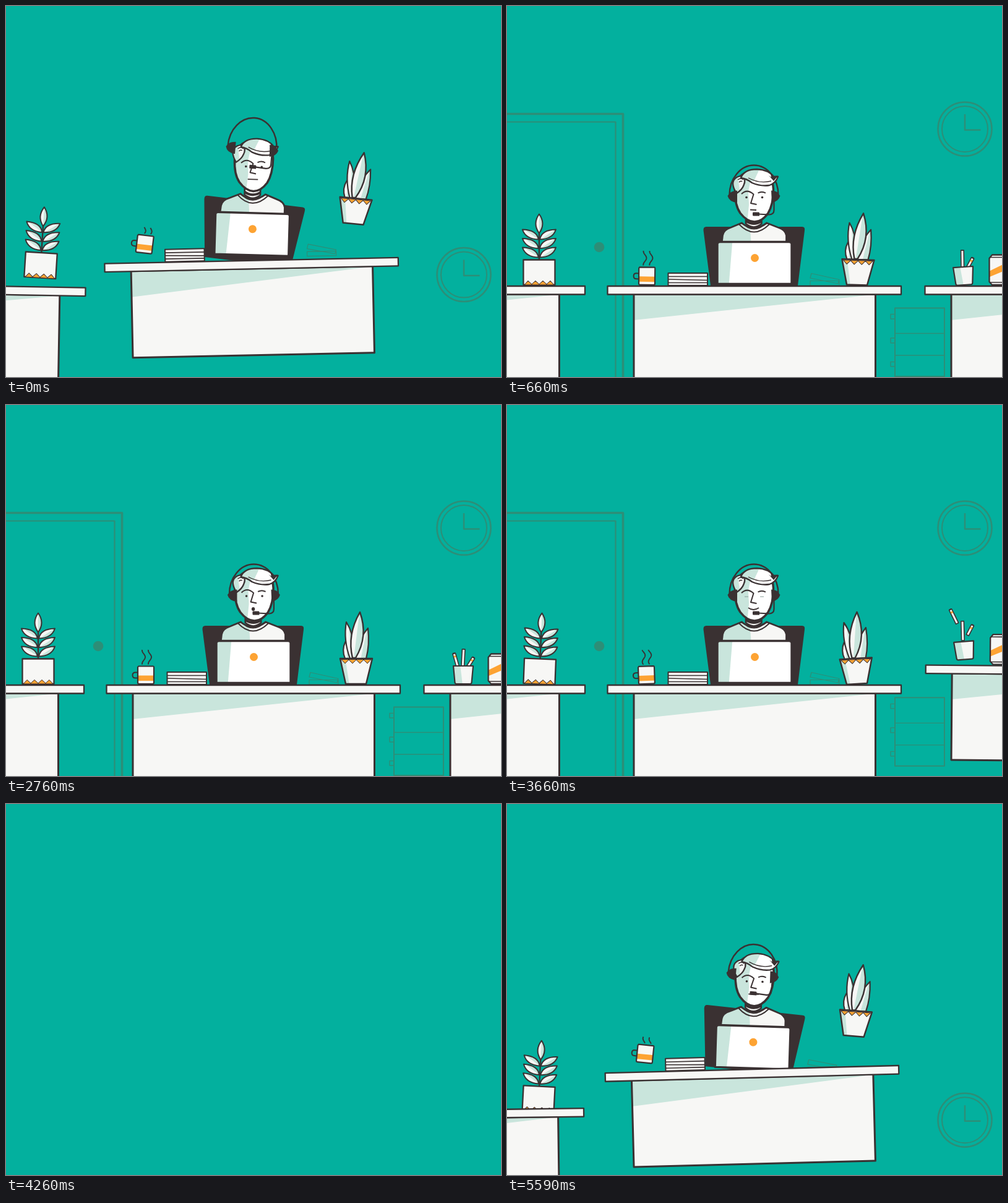
An HTML page with a canvas that plays this animation: 800x600 px, repeating every 5620 ms.

```html
<!DOCTYPE html>
<html lang="en">
<head>
<meta charset="utf-8">
<title>Office desk</title>
<style>
html, body { margin: 0; width: 100%; height: 100%; overflow: hidden; background: #03b09e; }
canvas { display: block; }
</style>
</head>
<body>
<canvas id="stage" width="800" height="600"></canvas>
<script>
const g = document.getElementById('stage').getContext('2d');
const LOOP = 5620, BG = '#03b09e', DARK = '#3a3132', WHITE = '#f7f7f5', PURE = '#ffffff',
  MINT = '#c9e5dc', ORANGE = '#fda333', FAINT = '#2d8e77';

const clamp = (x, a = 0, b = 1) => Math.max(a, Math.min(b, x));
const smooth = (a, b, x) => { const u = clamp((x - a) / (b - a)); return u * u * (3 - 2 * u); };

// Comes up from below, crosses rest at c with speed v, overshoots, is back after len.
function rise(e, c, v, len, cap = 1e4) {
  const d = e - c;
  if (d >= len) return 0;
  return d < 0 ? Math.min(cap, -v * d * (1 - 0.0006 * d)) : -v * d * (1 - d / len) ** 2;
}
// Slides up without overshoot.
const glide = (e, end) => 315 * (Math.max(0, end - e) / 336) ** 3;
// Swing in degrees that fades out at end.
const swing = (e, zero, period, amp, from, end) =>
  amp * Math.sin(2 * Math.PI * (e - zero) / period) * clamp((end - e) / (end - from), 0, 1.15);

const cache = new Map();
function path(d) {
  if (!cache.has(d)) cache.set(d, new Path2D(d));
  return cache.get(d);
}
function fill(d, color) { g.fillStyle = color; g.fill(path(d)); }
function line(d, w = 2, color = DARK) {
  g.strokeStyle = color;
  g.lineWidth = w;
  g.stroke(path(d));
}
function part(d, w, shade, base = WHITE, tone = MINT) {
  fill(d, base);
  if (shade) {
    g.save();
    g.clip(path(d));
    fill(shade, tone);
    g.restore();
  }
  line(d, w);
}
function disc(x, y, r, color) {
  g.fillStyle = color;
  g.beginPath();
  g.arc(x, y, r, 0, 7);
  g.fill();
}
// Draw with a shift and a turn about (px, py).
function pose(px, py, dx, dy, deg, draw) {
  g.save();
  g.translate(px + dx, py + dy);
  g.rotate(deg * Math.PI / 180);
  g.translate(-px, -py);
  draw();
  g.restore();
}

function desk(x) {
  g.save();
  g.translate(x, 0);
  part('M43 466H433.500V606H43Z', 3, 'M43 460H440L420 468 43 508Z');
  part('M.500 453H475V466.500H.500Z', 2.3);
  g.restore();
}

function door() {
  line('M-5 174.500H187.500V640', 3.6, FAINT);
  line('M-5 187.500H175.500V640', 2.2, FAINT);
  disc(149, 390, 8.3, FAINT);
}

function clock() {
  line('M783.500 199A43.500 43.500 0 1 1 696.500 199A43.500 43.500 0 1 1 783.500 199Z', 2.5, FAINT);
  line('M777 199A37 37 0 1 1 703 199A37 37 0 1 1 777 199Z', 2, FAINT);
  line('M740 175V200.500H765.500', 2.5, FAINT);
}

function drawers() {
  line('M627 488.500H707V599H627Z', 2, FAINT);
  line('M627 529.500H707M627 565H707M627 498.500H620V506H627M627 537H620V545H627M627 575.500H620V583H627', 1.4, FAINT);
}

function leafPlant() {
  line('M52 411V364', 2.3);
  for (const y of [0, 14.5, 29]) {
    for (const s of [1, -1]) {
      g.save();
      g.translate(52, y);
      g.scale(s, 1);
      part('M1 377.500Q4 362 27 361.500Q22 377 1 377.500Z', 2,
        s > 0 ? 'M0 379L27 361 27 380Z' : 'M0 360H27L0 378Z');
      g.restore();
    }
  }
  part('M52 336.500Q63 352 52 367.500Q41 352 52 336.500Z', 2, 'M52 330H70V370H52Z');
  part('M26.500 410.500H77.500V451H26.500Z', 2.3);
  part('M28 451L34 444.500 40 450 46 444.500 52 450 58 444.500 64 450 70 444.500 76 451Z', 1, null, ORANGE);
}

function spikyPlant() {
  part('M548 410Q542 396 548.500 383Q557 394 557 410Z', 2.2, 'M551 380H560V412H551Z');
  part('M556 410Q545 380 550 351Q561 368 563 396L560 410Z', 2.2, 'M553 345L565 360V412H558Z');
  part('M564 410Q567 382 585 361Q588 388 582 410Z', 2.2, 'M585 355L590 412H573Z');
  part('M560 409Q551 372 572 335Q586 374 565 409Z', 2.4, 'M572 330L590 345 580 400 562 410Z');
  part('M540 410H592L582 451H549Z', 2.5, 'M538 408H548L555 453H540Z');
  part('M542 411.500L548 418 554 412 560 418 566 412 572 418 578 412 584 418 590 411.500Z', 1, null, ORANGE);
}

function mug(t, e) {
  line('M213 432.500H209Q204.500 432.500 204.500 437T209 441.500H213', 2);
  part('M214 422.500H238Q239 422.500 239 424V449Q239 451 237 451H215Q213 451 213 449V424Z', 2.2,
    'M210 437.500H241V446H210Z', WHITE, ORANGE);
  const len = 10 + 13.5 * smooth(330, 620, e);
  g.strokeStyle = DARK;
  g.lineWidth = 1.9;
  for (const x of [222.500, 232.500]) {
    g.beginPath();
    for (let k = 0; k <= len; k += 0.5)
      g.lineTo(x + 2.5 * Math.sin(k / 3.4 + t / 167 + 0.4), 419.5 - k);
    g.stroke();
  }
}

function books() {
  part('M260.500 432H324V452H260.500Z', 2);
  line('M261 437.500H324M261 442L324 443.500M261 447.500H324', 1.6);
}

function papers() {
  line('M492 432.500L537 442.500 535 449 490 440Z M490 444.500H537V452H490Z', 1.2, FAINT);
}

function chair() {
  fill('M317.500 363Q317 357 322 357H477Q482 357 481 363L469.500 456H329.500Z', DARK);
}

function laptop() {
  part('M344 381.500H456Q460 381.500 460 385V449.500H340V385Q340 381.500 344 381.500Z', 3.4,
    'M335 378H364.500L358.500 452H335Z', PURE);
  disc(400.5, 407.5, 6.5, ORANGE);
}

function body(sw, breath) {
  g.save();
  g.translate(0, breath);
  part('M347 384L348.500 371Q350 362 361 358.500L379 351Q399 366 420 351L439 358.500Q450 362 451.500 371V384Z',
    2.8, 'M340 345H392L395 390H340Z');
  g.restore();
  pose(399, 360, sw * 1.5, 0, 0, () => {
    part('M386 338V352Q399 363 411.500 352V338Z', 2.6);
    fill('M386 345Q399 355 412 345V350Q399 358 386 350Z', DARK);
  });
  line('M379 350Q399 371 420 350M375 353Q399 378 424 353', 2);
}

function mouth(t) {
  const talk = t > 1900 && t < 3250 ? Math.cos(2 * Math.PI * (t - 2760) / 420) : -1;
  if (talk > 0.1) {
    g.fillStyle = DARK;
    g.beginPath();
    g.ellipse(398, 330, 2.7, 1 + 2 * talk, 0, 0, 7);
    g.fill();
  } else if (t > 3400 && t < 4300) line('M390 328Q398 334 407 328', 1.8);
  else if (t < 300 || t > 5000) line('M390.500 330H407', 1.7);
  else line('M393 329.500L403 330', 1.8);
}

function head(t) {
  const face = 'M368.500 298Q368 322 377 335Q388 349 400 349Q412 349 422 335Q430.500 321 430.500 296Q430 270 400 266Q369 270 368.500 298Z';
  part(face, 3.5, 'M360 260H398L390 300 391 322 388 352H360Z', PURE);
  part('M371 303Q362 289 367 281Q371 275 380 275Q387 281 382.500 290Q380 297 371 303Z', 2.3, 'M360 270H372L377 305H360Z');
  part('M378 278Q383 264 404 264Q423 265 431 276L438 276Q434 287 424 290Q410 292 396 286Q387 279 378 278Z',
    2.3, 'M376 260H410L399 283 376 282Z', PURE);
  line('M390 278Q408 288 427 283M373 281Q378 277 382 281M375 285Q378 282 380 284', 1.4);
  fill('M423 274L427 277 426 271 431 275 438 274.500 431 283Z', DARK);
  const raise = 1.3 * smooth(1250, 1600, t) * (1 - smooth(2350, 3100, t));
  g.save();
  g.translate(0, -raise);
  line('M379 304Q388 295 398.500 304.500L394 319 403.500 321', 2);
  line('M405.500 302.500Q412 299 418 302.500', 1.9);
  const closed = [1300, 2130, 3660].some(b => Math.abs(t - b) < 75);
  if (closed) line('M384 310H390M409 310H415', 1.1, '#879b95');
  else for (const x of [387, 412.500]) disc(x, 309.5, 1.8, DARK);
  g.restore();
  mouth(t);
}

function headsetFront() {
  fill('M372 298.500Q362 299 359 304L356.500 307Q359 317 372 318Z', DARK);
  fill('M427 298.500Q437 299 438 303L441.500 307Q439 316 428 318Z', DARK);
  line('M431.500 315V330Q431.500 337 424 337.500L406 336.500', 2.2);
  fill('M398 333.500H407Q408 333.500 408 335V339.500H398.500Q397 339.500 397 338V335Q397 333.500 398 333.500Z', DARK);
}

function person(t, e) {
  const sw = smooth(1150, 1600, t) * (1 - smooth(2350, 3150, t));
  const breath = 0.5 * Math.sin(Math.PI * clamp((t - 1200) / 1100)) ** 2;
  const set = draw => pose(399, 310, 3 * sw - 3 * smooth(545, 330, e), rise(e, 295, 1.5, 140, 12),
    swing(e, 230, 420, 3.2, 330, 600), draw);
  set(() => line('M359.500 306A39.500 48.500 0 0 1 438.500 306', 2.5));
  body(sw, breath);
  pose(399, 349, 3.3 * sw, rise(e, 300, 0.12, 260, 3), 0, () => head(t));
  set(headsetFront);
}

function pen(x, y, len, deg, cap, dy = 0) {
  pose(x, y, 0, dy, deg, () => {
    g.fillStyle = WHITE;
    g.strokeStyle = DARK;
    g.lineWidth = 1.6;
    g.beginPath();
    g.rect(x - 2.3, y - len, 4.6, len);
    g.fill();
    g.stroke();
    if (!cap) return;
    g.fillStyle = ORANGE;
    g.fillRect(x - 1.6, y - len + 3.5, 3.2, 3);
    g.fillStyle = DARK;
    g.fillRect(x - 2, y - len - 1.5, 4, 2);
  });
}

function cup(e) {
  const hop = swing(e, 915, 300, 34, 840, 1300);
  pen(731, 426, 25, -16 + hop / 6, true, hop);
  pen(738, 426, 31, 3, false, rise(e, 700, 0.2, 260, 5));
  pen(746, 424, 18, 32, true, rise(e, 690, 0.4, 270, 8));
  part('M723 422H755L752.500 449Q752 451 750 451H728Q726 451 725.500 449Z', 2.2, 'M720 420H734L738 453H720Z');
}

function can() {
  part('M784 402.500H830V451H784L779.500 446V408Z', 2.3, 'M775 431L812 413V425L775 440Z', WHITE, ORANGE);
  line('M781 406.500H830M781 447H830', 1.6);
}

function mainDesk(t, e) {
  pose(400, 606, 0, rise(e, 273, 1, 371), swing(e, 400, 400, 1.35, 330, 640), () => {
    pose(513, 452, 0, rise(e, 319, 0.4, 200, 14), 0, papers);
    pose(400, 415, 0, 0, swing(e, 230, 420, 8.2, 330, 700), chair);
    pose(400, 452, 0, rise(e, 307, 0.27, 300, 12), swing(e, 420, 460, -3, 330, 700), () => {
      person(t, e);
      laptop();
    });
    books();
    pose(226, 451, 0, rise(e, 225, 0.315, 300, 20), swing(e, 245, 330, 8, 330, 1040), () => mug(t, e));
    pose(565, 451, 0, rise(e, 235, 1.125, 330, 30), swing(e, 925, 340, 6.7, 330, 1300), spikyPlant);
    desk(162);
  });
}

function leftDesk(e) {
  pose(-111, 606, 0, rise(e, 330, 1.43, 290), swing(e, 313, 200, 1.8, 330, 560), () => {
    pose(52, 451, 0, rise(e, 314, 0.9, 200, 6), swing(e, 990, 600, -4.5, 330, 1350), leafPlant);
    desk(-349);
  });
}

function rightDesk(e) {
  pose(912, 606, 0, rise(e, 600, 1, 371), swing(e, 930, 260, -0.6, 840, 930), () => {
    pose(739, 451, 0, rise(e, 700, 0.25, 260, 10), swing(e, 765, 600, -7.3, 840, 1450), () => cup(e));
    can();
    desk(675);
  });
}

function frame() {
  const t = performance.now() % LOOP;
  g.fillStyle = BG;
  g.fillRect(0, 0, 800, 600);
  if (t < 4260 || t >= 5290) {
    // Leaving is the arrival played backwards, faster.
    const e = t >= 5290 ? t - 5290 : Math.min(t + 330, (4260 - t) * 1.4);
    pose(0, 0, 0, glide(e, 790), 0, door);
    pose(0, 0, 0, glide(e, 636), 0, clock);
    pose(0, 0, 0, rise(e, 553, 1, 371), 0, drawers);
    leftDesk(e);
    rightDesk(e);
    mainDesk(t, e);
  }
  requestAnimationFrame(frame);
}
g.lineJoin = 'round';
frame();
</script>
</body>
</html>
```
